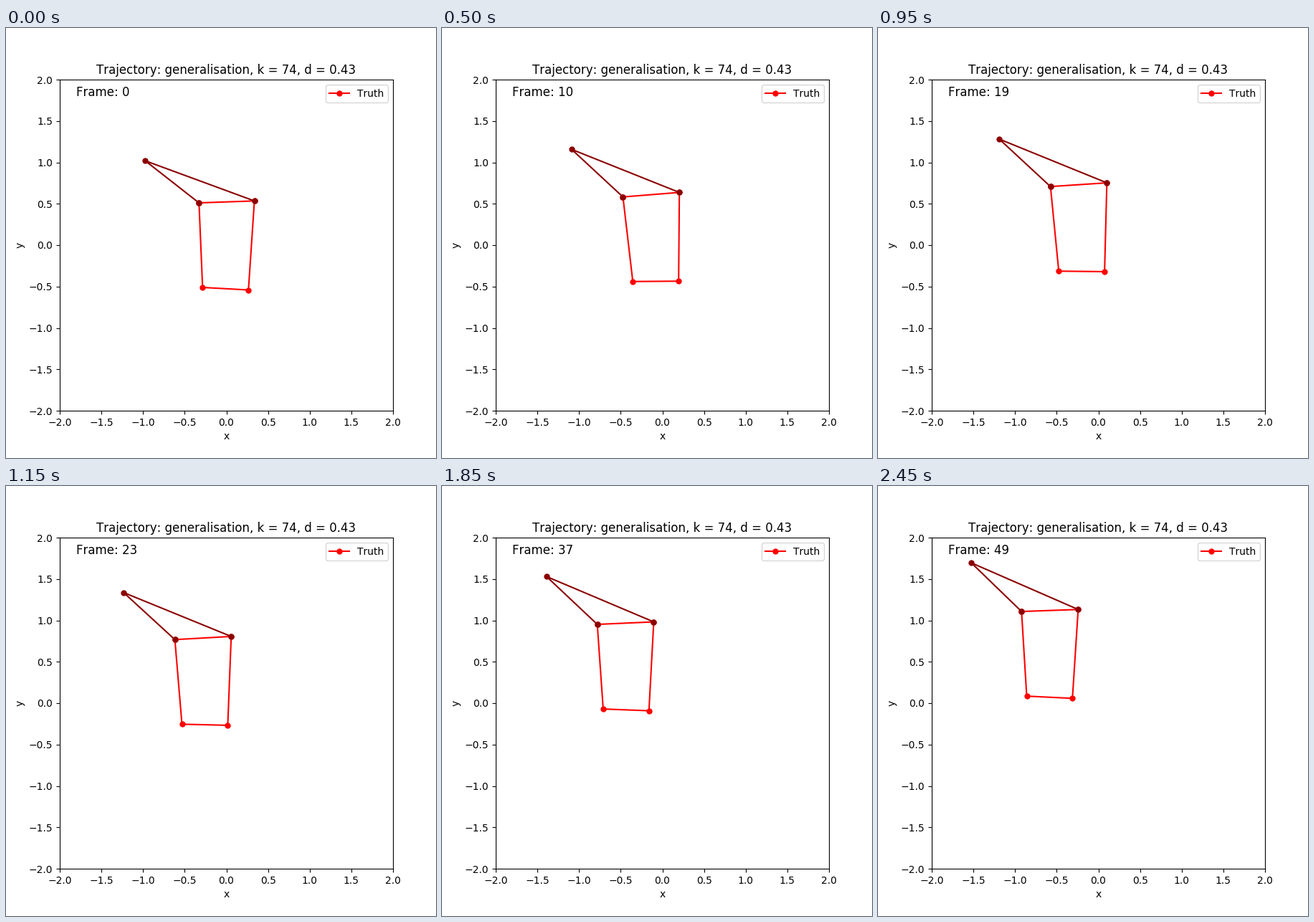
Write a matplotlib script that moves like this. It is 600 px wide and 600 px high and loops after 2.5 s.

```python
import numpy as np
import matplotlib.pyplot as plt
from matplotlib.animation import FuncAnimation

FRAMES, INTERVAL = 50, 50
LAST = FRAMES - 1

plt.rcParams["text.kerning_factor"] = 6  # letter spacing without kerning

# Joints in stage pixels: apex, top left, top right, bottom left, bottom right.
START = np.array([(194, 185), (269, 243.7), (346.3, 241), (274, 361.7), (338, 365.2)])
END = np.array([(130, 107), (200, 174.8), (279, 172), (207.2, 292.9), (271, 296)])
WOBBLE = np.array([(-0.3, 0), (-2.6, 5.5), (-1.6, 2.1), (5.3, 5.5), (5.3, 1.8)])


def swing(step):
    """Quick sway away from the straight drift, then a slow return."""
    rise = 1 - np.exp(-step / 3)
    drop = 0.45 / (1 + np.exp((step - 19) / 2))
    tail = 0.81 * (1 - step / LAST)
    return rise * (drop + tail)


def pose(step):
    """Joint positions in axis units (axes span 75-540 by 72-534 pixels)."""
    px = START + (END - START) * step / LAST + WOBBLE * swing(step) + 0.3
    x = (px[:, 0] - 75) / 465 * 4 - 2
    y = (534 - px[:, 1]) / 462 * 4 - 2
    return np.column_stack([x, y])


fig, ax = plt.subplots(figsize=(6, 6), dpi=100)
ax.set(xlim=(-2, 2), ylim=(-2, 2), xlabel="x", ylabel="y",
       title="Trajectory: generalisation, k = 74, d = 0.43")

body, = ax.plot([], [], "o-", color="red", ms=5, label="Truth")
head, = ax.plot([], [], "o-", color="darkred", ms=5)
counter = ax.text(-1.8, 1.8, "", fontsize=12)
ax.legend(loc="upper right")


def update(step):
    apex, top_l, top_r, low_l, low_r = pose(step)
    body.set_data(*np.array([top_l, low_l, low_r, top_r, top_l]).T)
    head.set_data(*np.array([top_l, apex, top_r]).T)
    counter.set_text(f"Frame: {step}")
    return body, head, counter


anim = FuncAnimation(fig, update, frames=FRAMES, interval=INTERVAL,
                     repeat=True, repeat_delay=0)
plt.show()
```
